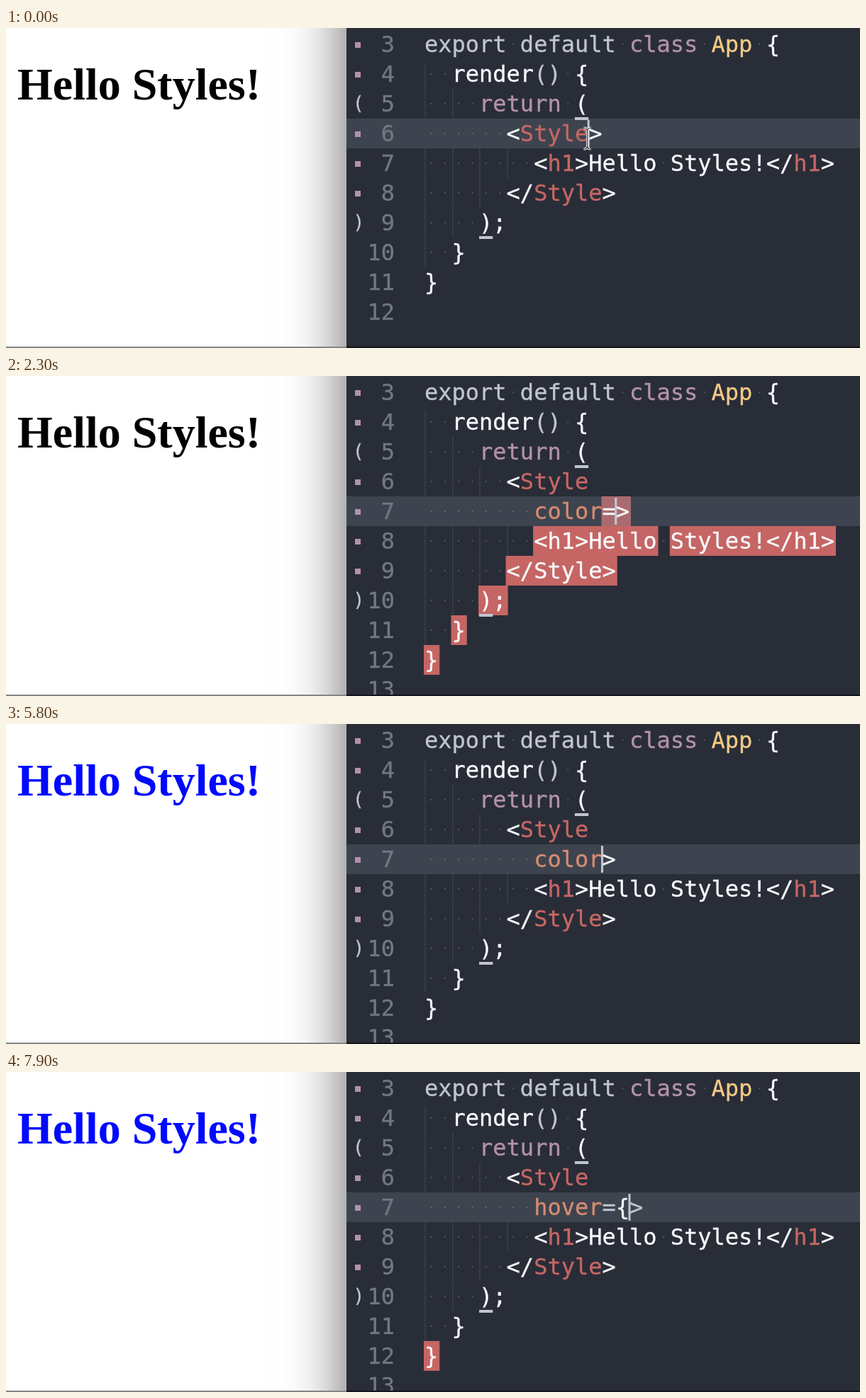
Write an HTML page that moves like this. It is 1204 px wide and 452 px high and loops after 8000 ms.

```html
<!DOCTYPE html>
<html lang="en">
<head>
<meta charset="utf-8">
<title>Hello Styles!</title>
<style>
  html, body { margin: 0; width: 100%; height: 100%; overflow: hidden; background: #fff; }
  #stage { position: relative; width: 1204px; height: 452px; overflow: hidden; }
  #shade { position: absolute; left: 480px; top: -200px; width: 900px; height: 852px;
           background: #292d38; box-shadow: 0 0 78px rgba(0, 0, 0, .62); }
  svg { position: absolute; left: 0; top: 0; }
  text { font: 32px "DejaVu Sans Mono", monospace; fill: currentColor; stroke: currentColor;
         stroke-width: .35px; white-space: pre; }
  .title { font: bold 64px "Liberation Serif", serif; stroke: none; }
  .mark { font-size: 26px; }
  .bold { font-weight: bold; }
  .slant { font-style: italic; }
  .w { color: #f8f9fb } .g { color: #c0c5ce } .p { color: #b391ac } .y { color: #f0ca85 }
  .r { color: #c56764 } .o { color: #d68b71 } .s { color: #a4bd8c } .n { color: #717783 }
  .hint { color: #ffb3a8 }
</style>
</head>
<body>
<div id="stage">
  <div id="shade"></div>
  <svg width="1204" height="452" viewBox="0 0 1204 452">
    <defs>
      <filter id="soft" x="-20%" y="-60%" width="140%" height="250%"><feGaussianBlur stdDeviation="8"/></filter>
    </defs>
    <text id="title" class="title" x="16" y="101">Hello Styles!</text>
    <g id="code"></g>
    <rect y="450" width="480" height="2" fill="#858585"/>
    <rect x="480" y="450" width="724" height="2" fill="#12141b"/>
  </svg>
</div>
<script>
const LOOP = 8000, BLUE_AT = 4400, LEFT = 590, CELL = 19.266, ROW = 42;
const ERROR = '#c56664', ERROR_ACTIVE = '#aa6b70';

// [start, attribute text]; "|" marks the caret when it is not at the end
const STEPS = [
  [0, null], [700, ''], [1400, 'c'], [1500, 'co'], [1600, 'col'], [1700, 'colo'], [1900, 'color'],
  [2200, 'color='], [2500, 'color="|"'], [3000, 'color="b|"'], [3100, 'color="bl|"'],
  [3300, 'color="blu|"'], [3500, 'color="blue|"'], [3700, 'color="blue"'],
  [5200, 'color="blue'], [5500, 'color="'], [5700, 'color'], [6000, ''],
  [6800, 'h'], [7000, 'ho'], [7100, 'hov'], [7300, 'hove'], [7400, 'hover'],
  [7700, 'hover='], [7900, 'hover={']
];
const POPUPS = [[1500, 1700], [7000, 7200]];

const code = document.getElementById('code');
const title = document.getElementById('title');
const colX = c => LEFT + c * CELL;
const rowY = n => 2 + (n - 3) * ROW;
const esc = s => s.replace(/&/g, '&amp;').replace(/</g, '&lt;').replace(/>/g, '&gt;');
const rect = (x, y, w, h, fill, more = '') =>
  `<rect x="${x}" y="${y}" width="${w}" height="${h}" fill="${fill}" ${more}/>`;
const text = (x, y, s, cls) => `<text x="${x}" y="${y}" class="${cls}">${esc(s)}</text>`;

function attrTokens(attr, bad) {
  const [, name, eq, open, value, close, brace] = attr.match(/^(\w*)(=?)("?)(\w*)("?)(\{?)/);
  return [[name, 'o'], [eq, bad ? 'x' : 'g'], [open, 'g'], [value, 's'], [close, 'g'], [brace, 'w']];
}

// Each line is [indent, [text, class]...]; class x is flagged as an error
function buildLines(attr) {
  const split = attr !== null;
  const bad = split && attr.endsWith('=');
  const inString = split && attr.split('"').length === 2;
  const brace = split && attr.endsWith('{');
  const rest = cls => bad ? 'x' : inString ? 's' : cls;
  const lines = [
    [0, ['export default ', 'g'], ['class ', 'p'], ['App ', 'y'], ['{', 'w']],
    [2, ['render', 'w'], ['() ', 'g'], ['{', 'w']],
    [4, ['return ', 'p'], ['(', 'w']]
  ];
  if (split) {
    lines.push([6, ['<', 'w'], ['Style', 'r']],
      [8, ...attrTokens(attr.replace('|', ''), bad), ['>', rest(brace ? 'g' : 'w')]]);
  } else {
    lines.push([6, ['<', 'w'], ['Style', 'r'], ['>', 'w']]);
  }
  lines.push(
    [8, ['<', rest('w')], ['h1', rest('r')], ['>Hello Styles!</', rest('w')], ['h1', rest('r')], ['>', rest('w')]],
    [6, ['</', rest('w')], ['Style', rest('r')], ['>', rest('w')]],
    [4, [');', rest('w')]],
    [2, ['}', rest('w')]],
    [0, ['}', brace ? 'x' : rest('w')]],
    [0]
  );
  return lines;
}

function drawLine([indent, ...tokens], n, active) {
  const y = rowY(n);
  let dots = '', boxes = '', glyphs = '', guides = '';
  const dot = c => {
    dots += `<circle cx="${colX(c + .5)}" cy="${y + 21}" r="1.15" fill="#c0c5ce" fill-opacity=".28"/>`;
  };
  for (let c = 0; c < indent; c++) {
    dot(c);
    if (c % 2 === 0 && !active) {
      const x = Math.round(colX(c)) + 1;
      guides += `<path d="M${x} ${y + (n === 4 ? 6 : 0)}V${y + ROW}" stroke="#4d535f" stroke-width="1.4" stroke-dasharray="1.5 1.5"/>`;
    }
  }
  let col = indent;
  for (const [s, cls] of tokens) {
    for (const part of s.split(/( )/)) {
      if (part === ' ') dot(col);
      else if (part) {
        if (cls === 'x')
          boxes += rect(colX(col) - 1, y, part.length * CELL + 3, ROW, active ? ERROR_ACTIVE : ERROR);
        glyphs += text(colX(col), y + 32, part, cls === 'x' ? 'w' : cls);
      }
      col += part.length;
    }
  }
  return guides + dots + boxes + glyphs;
}

function drawGutter(n, last, closeRow) {
  const y = rowY(n);
  const label = String(n);
  let out = text(548 - label.length * CELL, y + 32, label, 'n');
  if (n === 5) out += text(489, y + 28.5, '(', 'mark g');
  else if (n === closeRow) out += text(489.5, y + 28.5, ')', 'mark g');
  else if (n < closeRow) out += rect(492, y + 18, 8, 8, '#b391ac');
  return out;
}

const underline = (col, row) => rect(colX(col), rowY(row) + 40, CELL, 4, '#c0c5ce');

function drawPopup(word) {
  return rect(736, 218, 520, 50, '#14161d', 'filter="url(#soft)" opacity=".6"') +
    rect(735, 213, 520, 50, '#23262f') + rect(736, 214, 520, 48, '#ff6655') +
    text(744.5, 248, word, 'bold w') + text(1192, 248, word, 'slant hint');
}

function drawPointer() {
  const d = 'M814.5 141q4.500 0 5 4q.5-4 5-4M819.500 145V167M814.500 171q4.500 0 5-4q.5 4 5 4';
  return `<path d="${d}" fill="none" stroke="#fff" stroke-width="3"/>` +
    `<path d="${d}" fill="none" stroke="#222" stroke-width="1.200"/>`;
}

function draw(attr, popup) {
  const split = attr !== null;
  const activeRow = split ? 7 : 6;
  const closeRow = split ? 10 : 9;
  const lines = buildLines(attr);
  let out = rect(480, rowY(activeRow), 724, ROW, '#3e444f');
  lines.forEach((line, i) => {
    const n = i + 3;
    out += drawGutter(n, lines.length, closeRow) + drawLine(line, n, n === activeRow);
  });
  out += underline(11, 5) + underline(4, closeRow);
  const at = split ? attr.indexOf('|') : 0;
  const caret = split ? 8 + (at < 0 ? attr.length : at) : 12;
  out += rect(colX(caret) - 1.5, rowY(activeRow) + 2, 3, 38, '#c3c8d1');
  if (popup) out += drawPopup(attr);
  if (!split) out += drawPointer();
  code.innerHTML = out;
}

let shown = '';
function tick() {
  const t = performance.now() % LOOP;
  const attr = STEPS.filter(s => s[0] <= t).pop()[1];
  const popup = POPUPS.some(([a, b]) => t >= a && t < b);
  const key = attr + '/' + popup;
  if (key !== shown) draw(attr, popup);
  shown = key;
  title.setAttribute('fill', '#000');
  title.style.color = t >= BLUE_AT ? '#0009ff' : '#000';
  requestAnimationFrame(tick);
}
tick();
</script>
</body>
</html>
```
